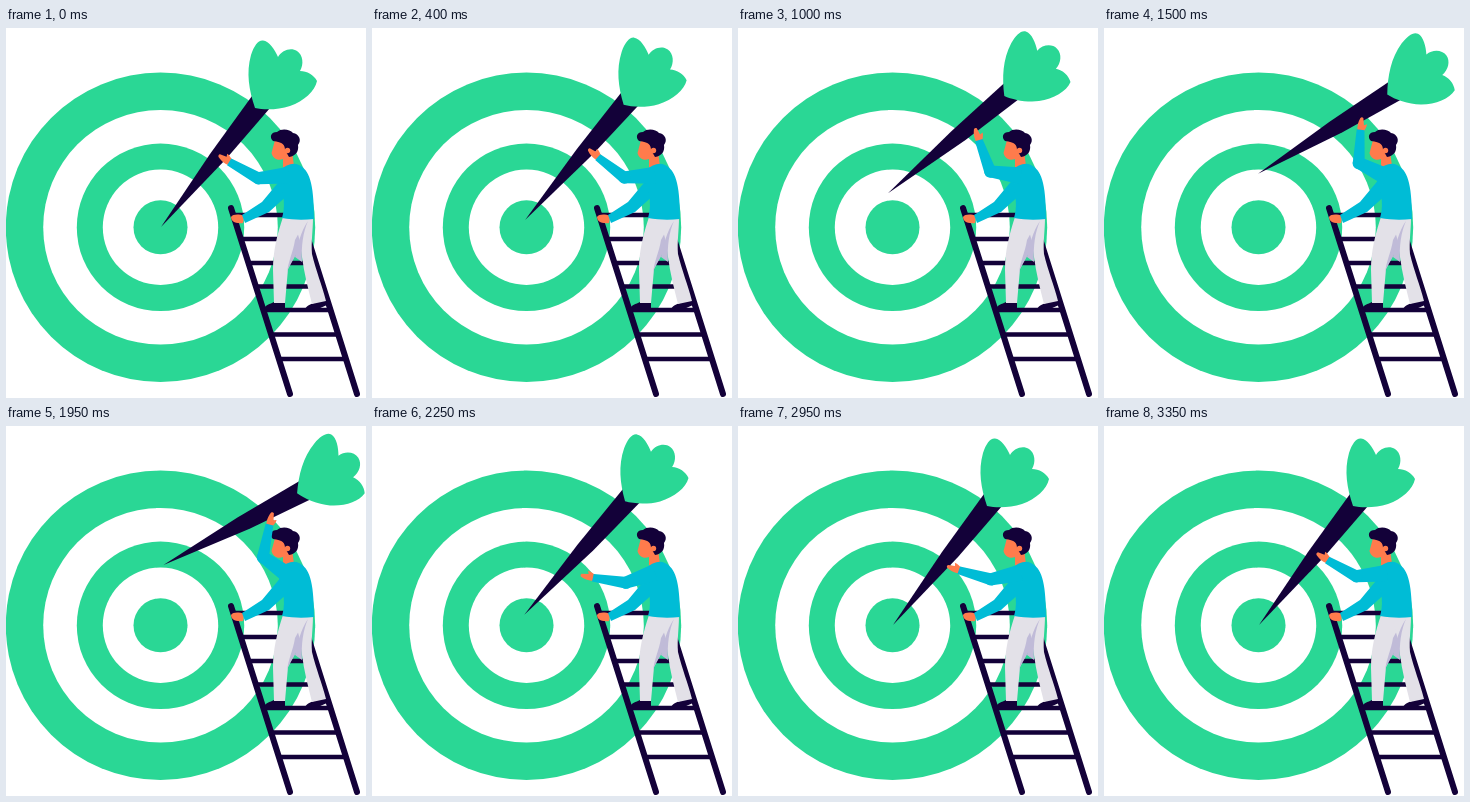
These frames come from a looping animation (360x370 px, 4 s). An HTML page:

```html
<!DOCTYPE html>
<html lang="en">
<head>
<meta charset="utf-8">
<title>Dart and target</title>
<style>
  /* --p: how far the dart is raised, --d: how far the free arm has dropped */
  @property --p { syntax: "<number>"; inherits: true; initial-value: 0; }
  @property --d { syntax: "<number>"; inherits: true; initial-value: 0; }

  html, body { margin: 0; width: 100%; height: 100%; overflow: hidden; background: #fff; }
  svg {
    display: block; width: 360px; height: 370px;
    animation: raise 4s infinite, drop 4s infinite;
    animation-timing-function: cubic-bezier(.37, 0, .63, 1);
  }
  @keyframes raise {
    0%, 58.33%, 100% { --p: 0; }
    50% { --p: 1; }
  }
  @keyframes drop {
    0%, 50%, 84.2%, 100% { --d: 0; }
    58.33% { --d: 1; }
  }

  .dart, .upper, .fore { transform-origin: 0 0; }
  .dart {
    transform:
      translate(calc((155 - 22.5 * var(--p) + 25 * var(--p) * var(--p)) * 1px),
                calc((199 - 75 * var(--p) + 15 * var(--p) * var(--p)) * 1px))
      rotate(calc(var(--p) * 23.5deg));
  }
  .upper {
    transform: translate(280px, 147px)
      rotate(calc((-6.5 + 14.6 * var(--p) + 26.8 * var(--p) * var(--p) - 19 * var(--d)) * 1deg));
  }
  .fore {
    transform: translate(-28px, 0px)
      rotate(calc((36 + 75.4 * var(--p) - 44.8 * var(--p) * var(--p) - 19.5 * var(--d)) * 1deg));
  }

  .green { fill: #2ad795; }
  .white { fill: #fff; }
  .navy { fill: #130139; }
  .cyan { fill: #00bcd6; }
  .skin { fill: #ff7b4c; }
  .cloth { fill: #e3e1e8; }
  .shade { fill: #c0bbd8; }
  .ladder { fill: none; stroke: #130139; stroke-linecap: round; }
</style>
</head>
<body>
<svg viewBox="0 0 360 370">
  <g class="target">
    <circle class="green" cx="154.5" cy="199.3" r="154.7"/>
    <circle class="white" cx="154.5" cy="199.3" r="117.3"/>
    <circle class="green" cx="154.5" cy="199.3" r="83.7"/>
    <circle class="white" cx="154.5" cy="199.3" r="57.7"/>
    <circle class="green" cx="154.5" cy="199.3" r="27"/>
  </g>

  <g class="dart">
    <g transform="translate(-155 -199)">
      <path class="navy" d="M155 199L204 126L246 68L264 80L220 131Z"/>
      <path class="green" d="M249 80C243 62 240 45 245 27C248 18 252 12 257 12.5C263 13 269 22 272 29C276 22 285 19 291 23C297 27 298 36 294 43C301 43 308 47 311 53C309 63 298 73 284 78C272 82 258 82 249 80Z"/>
    </g>
  </g>

  <g class="ladder">
    <path stroke-width="6" d="M225 180L284 366M293 182L351 366"/>
    <path stroke-width="4.6" d="M228 187H294M235 211H301M243 235H309M250 258.500H316M258 282H324M265 306.500H332M273 331H339"/>
  </g>

  <g class="man">
    <path class="navy" d="M258 281C259 277 264 276 268 274H279V281Z"/>
    <path class="navy" d="M299 281C301 277 306 276 310 274L320 272L321 277L312 281Z"/>
    <path class="cloth" d="M277 189C271 207 267 223 267 242L268 275H279L282 241L296 212L300 189Z"/>
    <path class="shade" d="M300 192L289 212C287 225 282 233 281 246L282 241L296 216Z"/>
    <path class="cloth" d="M287 189H307C307 203 305 213 306 226C310 243 316 257 320 273L306 276C302 260 298 245 296 229L293 210Z"/>
    <path class="shade" d="M302 193C295 203 291 218 289 229L296 234C295 219 297 204 302 193Z"/>

    <path class="skin" d="M269 112L265.500 125C267 131 272 133 277 131L277 141L288 138L285 116Z"/>
    <path class="navy" d="M267 113C263 109 265 104 271 104C275 100 284 101 287 105C293 106 296 112 292 117C293 123 290 128 283 129L279 122C279 117 277 114 267 113Z"/>
    <circle class="skin" cx="281.500" cy="122.500" r="2.700"/>

    <path class="skin" d="M238 188C233 186 227 186 225 189C225 193 229 196 237 195Z"/>
    <path class="cyan" d="M276 150L256 174L236 187L239 195L263 184L284 165Z"/>
    <path class="cyan" d="M274 142C280 137 287 134 293 137C303 142 308 154 308 191C298 192 287 192 276 190C279 180 279 168 273 155Z"/>
  </g>

  <g class="upper">
    <path class="cyan" d="M3 -8L-28 -6A6 6 0 0 0 -28 6L3 9Z"/>
    <g class="fore">
      <path class="skin" d="M-31 -3C-34 -4 -36 -6 -39 -6L-38 -3L-45 -2C-46 -1 -46 0 -45 1C-41 3 -37 4 -31 3Z"/>
      <path class="cyan" d="M1 -6L-33 -3.800L-33.500 4L0 6A6 6 0 0 0 1 -6Z"/>
    </g>
  </g>
</svg>
</body>
</html>
```
